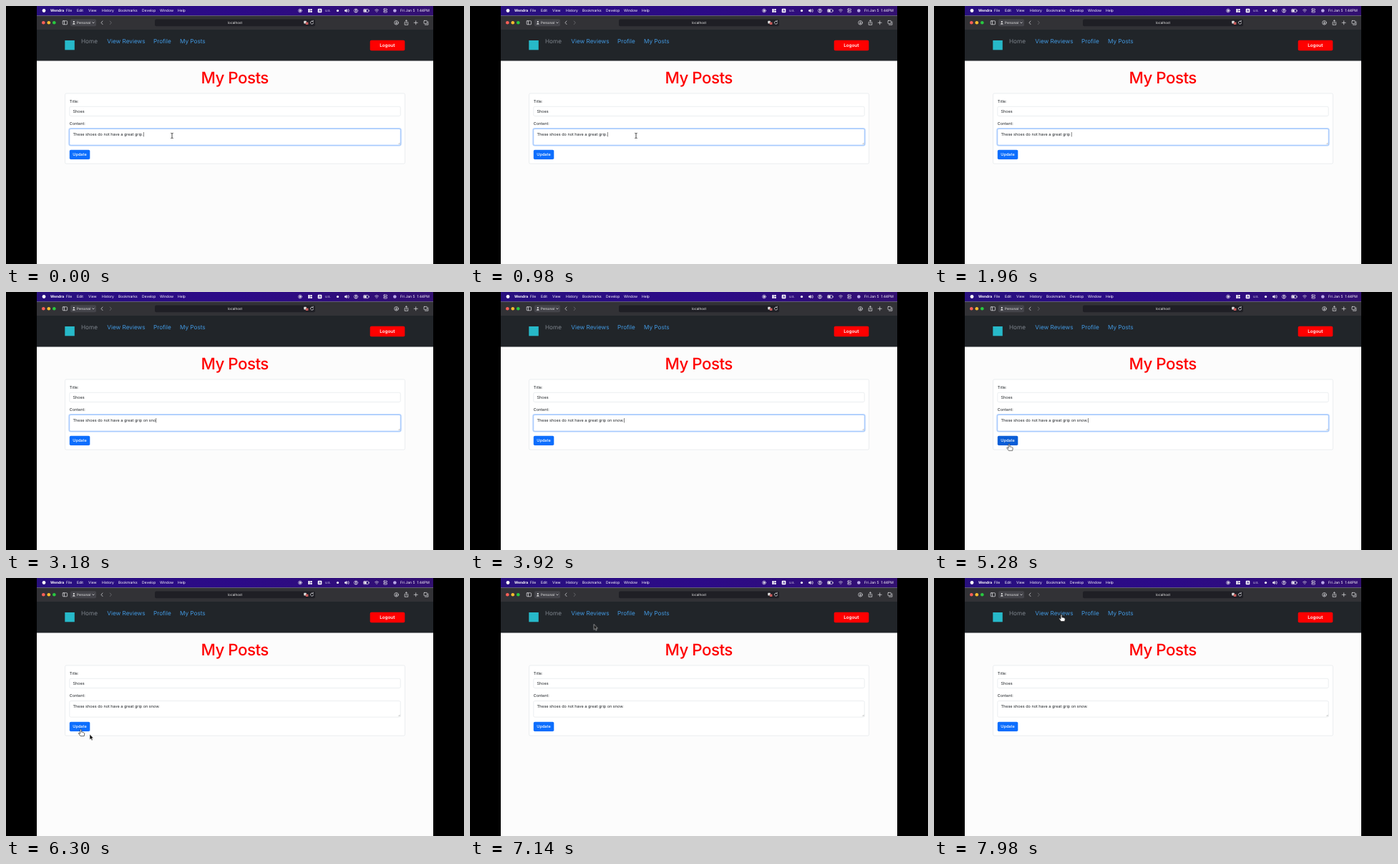
An HTML page for the animation above (8 s loop, 640 px wide and 360 px high).

```html
<!DOCTYPE html>
<html lang="en">
<head>
<meta charset="utf-8">
<title>My Posts</title>
<style>
  html, body { margin: 0; width: 100%; height: 100%; overflow: hidden; background: #000; }
  svg { display: block; width: 640px; height: 360px; }
  text { font-family: Inter, Roboto, sans-serif; text-rendering: geometricPrecision; white-space: pre; }

  .menu { font-size: 5px; fill: #fff; }
  .bold { font-weight: 700; }
  .tool { font-size: 4.6px; fill: #eee; }
  .link { font-size: 8.2px; fill: #4298e0; }
  .home { fill: #7d848c; }
  .heading { font-size: 22.3px; font-weight: 500; letter-spacing: -.5px; fill: #f00; }
  .form { font-size: 5.5px; fill: #212529; }
  .button { font-size: 5.6px; fill: #fff; font-weight: 500; }
  .logout { font-size: 6.3px; font-weight: 600; }
  .line { fill: none; stroke: #e4e4e8; stroke-width: .7; stroke-linecap: round; stroke-linejoin: round; }
  .field { fill: #fff; stroke: #dee2e6; stroke-width: .6; }

  .timed { animation: 8s step-end infinite; }
  #focus { animation-name: focus; }
  #update { animation-name: hover; }
  #ibeam { animation-name: ibeam; }
  #arrow { animation-name: arrow; }
  #hand { animation-name: hand; }
  #trail { animation-name: trail; }
  #pointer { animation: move 8s ease-in-out infinite; }

  @keyframes focus { 0% { opacity: 1 } 70%, 100% { opacity: 0 } }
  @keyframes hover { 0% { fill: #0d6efd } 58.75% { fill: #0b5ed7 } 75%, 100% { fill: #0d6efd } }
  @keyframes ibeam {
    0% { opacity: 1 } 16.25% { opacity: 0 }
    50.6% { opacity: 1 } 52.5%, 100% { opacity: 0 }
  }
  @keyframes arrow {
    0% { opacity: 0 } 52.5% { opacity: 1 } 58.75% { opacity: 0 }
    75% { opacity: 1 } 90%, 100% { opacity: 0 }
  }
  @keyframes hand {
    0% { opacity: 0 } 58.75% { opacity: 1 } 75% { opacity: 0 } 90%, 100% { opacity: 1 }
  }
  @keyframes trail { 0% { opacity: 0 } 76% { opacity: 1 } 80%, 100% { opacity: 0 } }
  @keyframes move {
    0%, 50.6% { transform: translate(232px, 181px) }
    53.1% { transform: translate(200px, 205px) }
    58.75% { transform: translate(112px, 213px) }
    62.5% { transform: translate(105px, 212px) }
    73.75% { transform: translate(104.5px, 211px) }
    77.5%, 81.25% { transform: translate(117px, 218px) }
    91.25%, 100% { transform: translate(178px, 51px) }
  }
</style>
</head>
<body>
<svg viewBox="0 0 640 360">
  <defs>
    <linearGradient id="sky">
      <stop offset="0" stop-color="#28107e"/>
      <stop offset=".5" stop-color="#2c0a88"/>
      <stop offset="1" stop-color="#321070"/>
    </linearGradient>
    <path id="handShape" d="M-.9 .6Q0-.6.9.6V4l1.4.1 1.3.4 1.2.7q.6.4.4 1.6L4.6 9.6H-.4L-3 6.2q-.5-1 .4-1.2l1.7 1.2Z"
      fill="#fff" stroke="#222" stroke-width=".7" stroke-linejoin="round"/>
  </defs>

  <rect width="640" height="360"/>
  <rect x="43" width="554" height="360" fill="#fcfcfc"/>

  <!-- Menu bar -->
  <rect x="43" width="554" height="13.5" fill="url(#sky)"/>
  <circle cx="53" cy="6.5" r="2.4" fill="#fff"/>
  <g class="menu">
    <text x="62" y="8.4" class="bold">Wendra</text>
    <text x="84" y="8.4">File</text>
    <text x="99" y="8.4">Edit</text>
    <text x="115" y="8.4">View</text>
    <text x="134" y="8.4">History</text>
    <text x="157" y="8.4">Bookmarks</text>
    <text x="190" y="8.4">Develop</text>
    <text x="215" y="8.4">Window</text>
    <text x="240" y="8.4">Help</text>
    <text x="446" y="8.2" font-size="4">U.S.</text>
    <text x="551" y="8.4">Fri Jan 5  1:44PM</text>
  </g>
  <g fill="#fff">
    <circle cx="411" cy="6.5" r="1.2"/>
    <rect x="422.3" y="4" width="2.3" height="5" rx=".5"/>
    <rect x="425.3" y="4" width="2.3" height="2.2" rx=".5"/>
    <rect x="425.3" y="6.8" width="2.3" height="2.2" rx=".5"/>
    <rect x="435.7" y="3.7" width="5.6" height="5.6" rx="1"/>
    <circle cx="463.5" cy="6.5" r="1.6"/>
    <path d="M473 5.5h1.3L476.3 4v5l-2-1.5H473Z"/>
    <circle cx="489" cy="5.8" r="1"/>
    <path d="M487.3 8.6q1.7-2 3.4 0Z"/>
    <rect x="500.3" y="5.3" width="3.4" height="2.6"/>
    <circle cx="543.3" cy="6.5" r="2.3" fill="#b9a8e8"/>
  </g>
  <text x="436.9" y="8.2" font-size="4.4" fill="#2c0a88" class="bold">A</text>
  <g class="line">
    <circle cx="411" cy="6.5" r="2.4"/>
    <path d="M477.5 5.3q1 1.2 0 2.4M478.7 4.4q1.8 2.1 0 4.2"/>
    <circle cx="489" cy="6.5" r="2.6"/>
    <rect x="499.5" y="4.5" width="7" height="4.2" rx="1"/>
    <path d="M507.5 6v1.2M515.5 5.6q2.5-2.3 5 0M516.6 7q1.4-1.2 2.8 0M518 8.5v.1"/>
    <rect x="527.6" y="4" width="5" height="2" rx="1"/>
    <rect x="527.6" y="7" width="5" height="2" rx="1"/>
  </g>

  <!-- Browser toolbar -->
  <rect x="43" y="13.5" width="554" height="19.5" fill="#323236"/>
  <circle cx="52.3" cy="23.3" r="2.3" fill="#ff5f57"/>
  <circle cx="59.8" cy="23.3" r="2.3" fill="#febc2e"/>
  <circle cx="67.3" cy="23.3" r="2.3" fill="#28c840"/>
  <rect x="90" y="18.3" width="36" height="10" rx="2" fill="#44444a"/>
  <rect x="208" y="18.5" width="224" height="9.8" rx="2" fill="#1f1f25"/>
  <g class="tool">
    <text x="99" y="25">Personal</text>
    <text x="320" y="25" font-size="4.7" text-anchor="middle">localhost</text>
  </g>
  <circle cx="94.8" cy="22" r="1.1" fill="#eee"/>
  <path d="M92.8 25.4q2-3.4 4 0Z" fill="#eee"/>
  <g class="line">
    <rect x="79.2" y="20.8" width="6.4" height="5" rx=".8"/>
    <path d="M81.5 21v4.6M120.8 22.8l1.2 1.2 1.2-1.2M135 21l-2 2.3 2 2.3"/>
    <path d="M145.3 21l2 2.3-2 2.3" stroke="#77777c"/>
    <path d="M429 21.6a2.1 2.1 0 1 0 .6 2M427.8 21.5h1.4v-1.4"/>
    <circle cx="545.5" cy="23.3" r="2.8"/>
    <path d="M545.5 21.8v3M544.3 23.7l1.2 1.2 1.2-1.2"/>
    <path d="M557.7 22.6h-.6v3.7h4.6v-3.7H561M559.4 24.2v-4.3M558.1 21l1.3-1.3 1.3 1.3"/>
    <path d="M570.2 23.3h5M572.7 20.8v5"/>
    <rect x="584" y="20.4" width="4.3" height="4.3" rx=".6"/>
    <path d="M585.6 26.2h4.3v-4.3"/>
  </g>
  <rect x="416.2" y="20.8" width="3.6" height="3.6" rx=".7" fill="#ddd"/>
  <rect x="418.8" y="22.5" width="3.6" height="3.6" rx=".7" fill="#c65b5b"/>

  <!-- Site header -->
  <rect x="43" y="33" width="554" height="43.5" fill="#212529"/>
  <rect x="82.3" y="48" width="13.5" height="13.3" fill="#27b9c9"/>
  <g class="link">
    <text x="105" y="51.6" class="home">Home</text>
    <text x="141.3" y="51.6">View Reviews</text>
    <text x="206" y="51.6">Profile</text>
    <text x="243" y="51.6">My Posts</text>
  </g>
  <rect x="508.7" y="47.8" width="48.6" height="14.4" rx="2" fill="#f00"/>
  <text x="532.8" y="57.3" text-anchor="middle" class="button logout">Logout</text>

  <!-- Post form -->
  <text x="319.7" y="108" text-anchor="middle" class="heading">My Posts</text>
  <rect x="82.5" y="122" width="475" height="98" rx="1.8" class="field"/>
  <rect x="88.8" y="140.3" width="462.4" height="13.2" rx="1.8" class="field"/>
  <rect x="88.8" y="171.5" width="462.4" height="22.6" rx="1.8" class="field"/>
  <g id="focus" class="timed">
    <rect x="88.2" y="170.9" width="463.6" height="23.8" rx="2.4" fill="none" stroke="#bad5fd" stroke-width="1.8"/>
    <rect x="88.8" y="171.5" width="462.4" height="22.6" rx="1.8" fill="#fff" stroke="#86b7fe" stroke-width=".6"/>
    <rect id="caret" y="176" width=".6" height="6.4" fill="#333"/>
  </g>
  <path d="M548.4 193l2.2-2.2M549.8 193l.8-.8" stroke="#888" stroke-width=".5"/>
  <g class="form">
    <text x="88.8" y="134.7">Title:</text>
    <text x="93.4" y="149">Shoes</text>
    <text x="88.8" y="166.2">Content:</text>
    <text id="content" x="93.4" y="180.6"></text>
  </g>
  <rect id="update" class="timed" x="88.8" y="200.8" width="28.5" height="13.3" rx="1.8" fill="#0d6efd"/>
  <text x="103" y="209.4" text-anchor="middle" class="button">Update</text>

  <!-- Mouse pointer -->
  <g id="trail" class="timed"><use href="#handShape" x="104.5" y="211"/></g>
  <g id="pointer">
    <path id="ibeam" class="timed" d="M-1.7-3.7Q0-3.7 0-2.5V2.5Q0 3.7-1.7 3.7M1.7-3.7Q0-3.7 0-2.5M0 2.5Q0 3.7 1.7 3.7"
      fill="none" stroke="#222" stroke-width=".8"/>
    <path id="arrow" class="timed" d="M0 0V7.6L1.7 6.1 2.9 8.7 4.1 8.1 3 5.6H5.2Z"
      fill="#111" stroke="#fff" stroke-width=".5"/>
    <g id="hand" class="timed"><use href="#handShape"/></g>
  </g>
</svg>
<script>
  const LOOP = 8000;
  const BASE = 'These shoes do not have a great grip';
  const ADDED = ' on snow.';
  const ERASE_AT = 1300;
  const KEY_TIMES = [1850, 2150, 2290, 2430, 2650, 2850, 3080, 3420, 3700];

  const content = document.getElementById('content');
  const caret = document.getElementById('caret');
  // A trailing space can be left out of the measured text, so its width is added by hand.
  const SPACE = 1.5;

  function textAt(t) {
    if (t < ERASE_AT) return BASE + '.';
    return BASE + ADDED.slice(0, KEY_TIMES.filter(key => key <= t).length);
  }

  function draw(now) {
    const text = textAt(now % LOOP);
    const shown = text.trimEnd();
    if (content.textContent !== shown) content.textContent = shown;
    const gap = (text.length - shown.length) * SPACE;
    caret.setAttribute('x', 93.6 + content.getComputedTextLength() + gap);
    requestAnimationFrame(draw);
  }
  requestAnimationFrame(draw);
</script>
</body>
</html>
```
